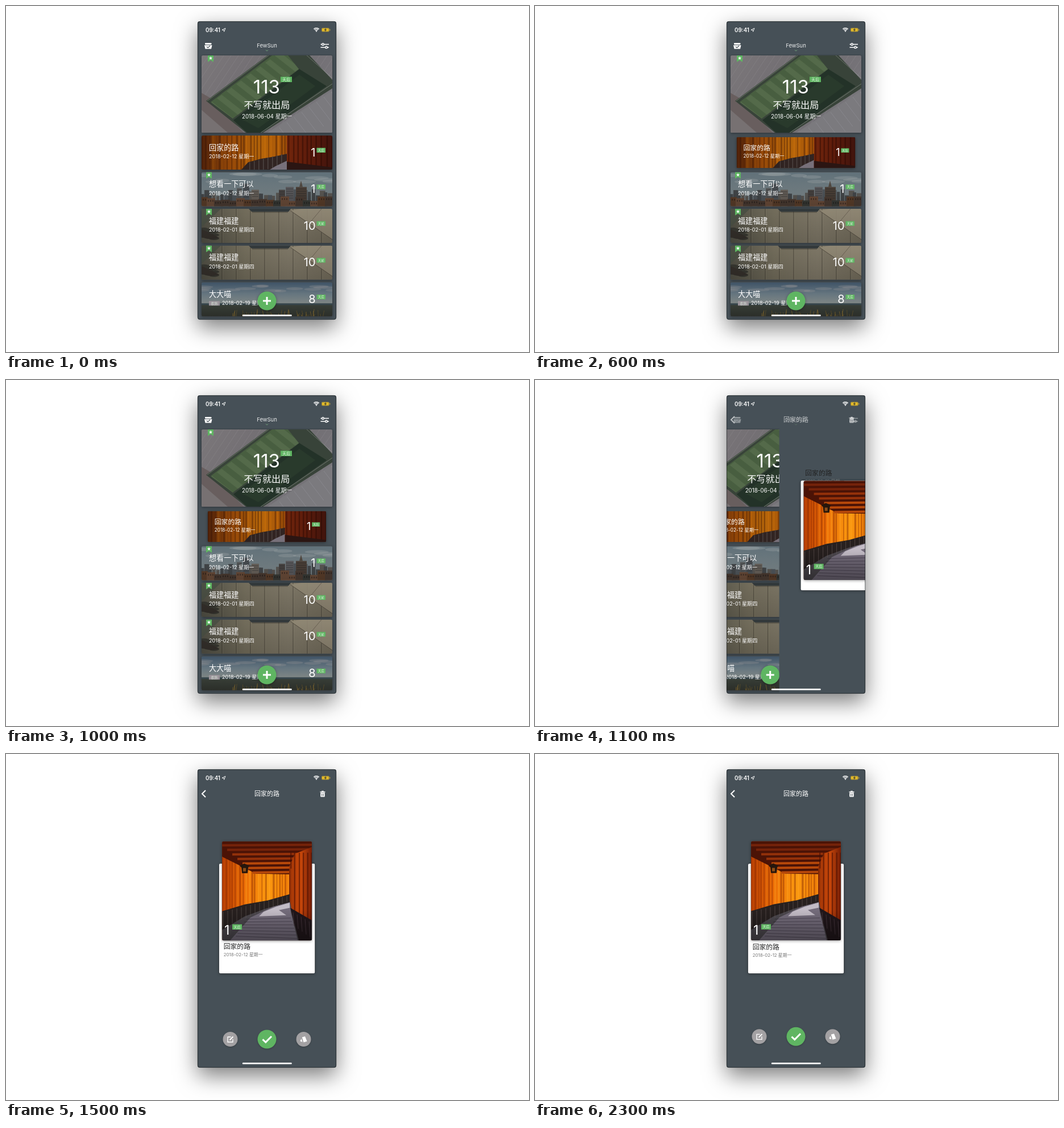
Animation, 920 px wide and 609 px high, one loop 2400 ms. Source, as an HTML page with a canvas:

```html
<!DOCTYPE html>
<html lang="zh">
<head>
<meta charset="utf-8">
<style>
html, body { margin: 0; width: 100%; height: 100%; overflow: hidden; background: #fff; }
canvas { display: block; width: 920px; height: 609px; }
</style>
</head>
<body>
<canvas id="stage"></canvas>
<script>
const canvas = document.getElementById('stage');
const dpr = window.devicePixelRatio || 1;
canvas.width = 920 * dpr;
canvas.height = 609 * dpr;
const c = canvas.getContext('2d');
const FONT = 'Inter, "Noto Sans CJK SC", "Noto Sans CJK", sans-serif';
const SLATE = '#465057', GREEN = '#5fb562';
const LOOP = 2400, STEP = 100;

function seeded(s) {
  return () => (s = (s * 16807) % 2147483647) / 2147483647;
}

function rect(color, x, y, w, h) {
  c.fillStyle = color;
  c.fillRect(x, y, w, h);
}

function round(color, x, y, w, h, r) {
  c.fillStyle = color;
  c.beginPath();
  c.roundRect(x, y, w, h, r);
  c.fill();
}

function disc(color, x, y, r) {
  c.fillStyle = color;
  c.beginPath();
  c.arc(x, y, r, 0, 7);
  c.fill();
}

function blob(color, x, y, rx, ry) {
  c.fillStyle = color;
  c.beginPath();
  c.ellipse(x, y, rx, ry, 0, 0, 7);
  c.fill();
}

function trace(p) {
  c.beginPath();
  for (let i = 0; i < p.length; i += 2) c.lineTo(p[i], p[i + 1]);
}

function poly(color, ...p) {
  trace(p);
  c.fillStyle = color;
  c.fill();
}

function line(color, width, ...p) {
  trace(p);
  c.strokeStyle = color;
  c.lineWidth = width;
  c.stroke();
}

function fade(x0, y0, x1, y1, ...colors) {
  const g = c.createLinearGradient(x0, y0, x1, y1);
  colors.forEach((k, i) => g.addColorStop(i / (colors.length - 1), k));
  return g;
}

function text(s, x, y, size, color = '#fff', align = 'left', weight = 400) {
  c.font = `${weight} ${size}px ${FONT}`;
  c.textAlign = align;
  c.fillStyle = color;
  c.fillText(s, x, y);
}

function group(draw) {
  c.save();
  draw();
  c.restore();
}

function shadow(color, blur, dy) {
  c.shadowColor = color;
  c.shadowBlur = blur * dpr;
  c.shadowOffsetY = dy * dpr;
}

// Rounded, shadowed panel; draw() works in its local coordinates.
function panel(x, y, w, h, r, draw) {
  group(() => {
    c.translate(x, y);
    group(() => {
      shadow('rgba(0,0,0,.4)', 5, 1);
      round('#555', 0, 0, w, h, r);
    });
    c.beginPath();
    c.roundRect(0, 0, w, h, r);
    c.clip();
    draw(w, h);
  });
}

function badge(s, x, y, w, h, size, color = GREEN) {
  rect(color, x, y, w, h);
  text(s, x + w / 2, y + h / 2 + size * 0.37, size, '#e4f5e4', 'center');
}

function flag(x, y) {
  poly(GREEN, x, y, x + 10, y, x + 10, y + 11.5, x + 5, y + 8.5, x, y + 11.5);
  const star = [];
  for (let i = 0; i < 10; i++) {
    const r = i % 2 ? 1.4 : 3.2, a = i * Math.PI / 5 - Math.PI / 2;
    star.push(x + 5 + r * Math.cos(a), y + 4.8 + r * Math.sin(a));
  }
  poly('#fff', ...star);
}

// ---- scenery ----

function stadium(w, h) {
  rect(fade(0, 0, w, h, '#858184', '#79757a', '#858489'), 0, 0, w, h);
  for (let i = -10; i < 26; i++) line('rgba(205,200,205,.13)', 1, i * 13, 0, i * 13 - 90, h);
  poly('#716666', 0, 66, 14, 74, 74, h, 0, h);
  poly('#817b7c', 0, 96, 46, h, 0, h);
  poly('#3d493e', 8, 80, 116, 0, 190, 0, 230, 43, 230, 58, 108, h, 78, h);
  poly('#26362b', 56, 114, 172, 24, 220, 54, 104, h, 80, h);
  poly('#2d3f30', 70, 112, 172, 34, 200, 54, 100, 128);
  group(() => {
    trace([16, 82, 124, 0, 152, 0, 171, 24, 55, 111]);
    c.clip();
    rect('#4e6645', 0, 0, w, h);
    for (let i = 0; i < 10; i++) {
      const x = 10 + i * 17, y = 88 - i * 12.5;
      poly('#5b7350', x, y, x + 8.5, y - 6.3, x + 60, y + 34, x + 51, y + 40);
    }
  });
  line('rgba(190,200,180,.5)', 0.8, 10, 80, 118, 0);
  line('rgba(190,195,190,.45)', 1, 104, h, 230, 50);
  line('rgba(190,195,190,.4)', 1, 185, 0, 230, 40);
  poly('#858489', 230, 62, 230, h, 116, h);
  for (let i = 0; i < 9; i++) line('rgba(205,205,212,.2)', 1, 124 + i * 13, h - i * 9, 150 + i * 13, h + 34 - i * 9);
  rect('rgba(0,0,0,.08)', 0, 0, w, h);
}

function gateStrip(w, h) {
  const rnd = seeded(31);
  rect(fade(0, 0, 150, 0, '#642a0b', '#a65009', '#b9680a', '#a35208'), 0, 0, 151, h);
  for (let x = 0; x < 150; x += 4 + rnd() * 5) {
    rect(rnd() < 0.5 ? 'rgba(60,20,5,.4)' : 'rgba(225,125,15,.32)', x, 0, 1 + rnd() * 3, h);
  }
  poly('#312422', 70, h, 82, 47, 104, 41, 128, 37, 151, 32, 151, h);
  for (let i = 0; i < 8; i++) rect('#4d4442', 84 + i * 8, 47 - i * 2, 1.5, 20);
  poly('#77707a', 120, h, 130, 54, 151, 44, 151, h);
  rect(fade(150, 0, w, 0, '#73260c', '#5c1b0b', '#40140d'), 150, 0, w - 150, h);
  for (let x = 152; x < w; x += 6 + rnd() * 5) rect('rgba(30,5,2,.4)', x, 0, 2.5, h);
  poly('#2b1512', 150, 46, w, 56, w, h, 150, h);
  rect(fade(0, 0, 110, 0, 'rgba(0,0,0,.2)', 'rgba(0,0,0,0)'), 0, 0, 110, h);
}

function city(w, h) {
  const rnd = seeded(77);
  rect(fade(0, 0, 0, 40, '#667780', '#87959a'), 0, 0, w, h);
  for (let i = 0; i < 12; i++) blob('rgba(190,196,196,.25)', rnd() * w, 3 + rnd() * 20, 12 + rnd() * 14, 3);
  for (let x = -2; x < w; x += 7) {
    const top = 30 + rnd() * 12;
    rect(['#4c5053', '#65625e', '#596066'][rnd() * 3 | 0], x, top, 5 + rnd() * 5, h);
  }
  for (const [x, y, bw, k] of [[62, 28, 9, '#636667'], [73, 20, 11, '#555b60'], [88, 31, 13, '#746d65'],
    [136, 31, 11, '#524d4b'], [148, 26, 14, '#666568'], [166, 26, 19, '#55483f']]) {
    rect(k, x, y, bw, h);
    for (let j = y + 3; j < 46; j += 4) rect('rgba(25,28,32,.35)', x + 1, j, bw - 2, 1.2);
  }
  poly('#595047', 172, 26, 175, 15, 178, 26);
  for (let x = -4; x < w; x += 13) {
    const y = 42 + rnd() * 9;
    rect(['#65452f', '#534238', '#775540', '#3f413c'][rnd() * 4 | 0], x, y, 15, h);
    for (let j = 2; j < 13; j += 4) rect('rgba(25,22,20,.45)', x + j, y + 3, 2, 3);
  }
  rect(fade(0, 0, 0, h, 'rgba(0,0,0,.05)', 'rgba(0,0,0,.25)'), 0, 0, w, h);
}

function wood(w, h) {
  rect(fade(0, 0, w, 0, '#535247', '#77715f', '#837c6b', '#77705f'), 0, 0, w, h);
  for (let x = 36; x < w; x += 25) {
    line('rgba(45,40,34,.55)', 1, x, 0, x, h);
    line('rgba(165,155,132,.22)', 1, x + 1.5, 0, x + 1.5, h);
  }
  poly('#4e5347', 0, 0, 34, 0, 0, 32);
  poly('rgba(151,142,123,.9)', 156, 3, 176, 0, w, 0, w, 54);
  line('#575044', 1, 156, 3, w, 54);
  line('rgba(70,62,52,.6)', 0.8, 190, 25, 211, 0);
  poly('#343b3d', 83, 0, 157, 0, 153, 5, 88, 5);
  rect('rgba(35,35,30,.3)', 89, 5, 63, 2);
  for (let i = 0; i < 9; i++) blob('#3b3b34', 4 + i % 3 * 9, 36 + i * 2, 9, 3);
  poly('#37322d', 0, 36, 18, 44, 31, 51, 17, 54, 0, 50);
  rect(fade(0, 0, 0, h, 'rgba(0,0,0,.04)', 'rgba(0,0,0,.18)'), 0, 0, w, h);
}

function meadow(w, h) {
  const rnd = seeded(52);
  rect(fade(0, 0, 0, 40, '#3f5366', '#65757f', '#828885'), 0, 0, w, 40);
  for (let i = 0; i < 14; i++) blob('rgba(155,152,152,.28)', rnd() * w, 3 + rnd() * 13, 10 + rnd() * 13, 2.5);
  rect('#36454b', 0, 37, w, 5);
  rect(fade(0, 40, 0, h, '#373d36', '#2b2e29'), 0, 40, w, 20);
  for (let i = 0; i < 55; i++) {
    const x = 50 + rnd() * 175, y = 47 + rnd() * 10;
    line(i % 3 ? '#5a4d2a' : '#76602e', 0.8, x, 60, x + rnd() * 4 - 2, y);
  }
}

function gatePhoto(w, h) {
  const rnd = seeded(9);
  rect('#8d2f06', 0, 0, w, h);
  rect(fade(0, 0, 119, 0, '#b83f04', '#eb6c06', '#fb990f', '#f07c08'), 0, 26, 120, 105);
  for (let x = 0; x < 119; x += 3 + rnd() * 4) {
    rect(rnd() < 0.55 ? 'rgba(125,35,0,.42)' : 'rgba(255,165,35,.35)', x, 28, 1 + rnd() * 2.5, 105);
  }
  // receding ceiling beams
  poly('#4b1306', 0, 0, w, 0, w, 24, 119, 58, 60, 57, 0, 27);
  for (let i = 0; i < 7; i++) {
    const y = 5 + i * 8, x = i * 9;
    poly(['#75230a', '#94310a', '#b7480a'][Math.min(2, i >> 1)], x, y, w - i * 6, y - 1, w - i * 6, y + 3, x, y + 4);
  }
  // right wall
  poly(fade(118, 0, w, 0, '#9f3406', '#c9480a', '#761e06'), 118, 45, 128, 22, w, 10, w, h, 118, 122);
  for (let x = 120; x < w; x += 5 + rnd() * 4) rect('rgba(65,12,2,.55)', x, 20, 2.3, 130);
  rect(fade(118, 0, 124, 0, '#7a2505', '#b94108'), 118, 48, 5, 70);
  // path, posts and dark edge
  poly('#4b474d', 0, 148, 40, 125, 119, 104, 122, 118, w, 151, w, h, 0, h);
  poly('#746c7b', 14, h, 50, 134, 92, 114, 119, 107, 121, 125, 133, h);
  poly('#c3bcc6', 73, 124, 95, 115, 119, 108, 119, 117, 100, 121, 113, 130, 65, 132);
  for (let i = 0; i < 7; i++) line('rgba(38,33,45,.45)', 1, 42 - i * 3, 137 + i * 5, 121 + i * 2, 135 + i * 6);
  poly('#27201f', 0, 123, 40, 111, 80, 104, 119, 93, 119, 107, 78, 118, 40, 132, 0, 156);
  for (let i = 0; i < 15; i++) {
    const x = 2 + i * 8;
    line('rgba(110,98,96,.55)', 1, x, 124 - i * 2, x, 151 - i * 3.2);
  }
  poly('#20161a', 120, 117, w, 139, w, h, 135, h);
  for (let i = 0; i < 5; i++) line('#42333a', 1, 125 + i * 7, 125 + i * 4, 127 + i * 7, 149 + i * 5);
  poly('#26160c', 31, 43, 39, 39, 48, 43, 46, 46, 45, 56, 35, 56, 34, 46);
  rect('#8e4e18', 37, 47, 5, 6);
  rect(fade(0, 120, 0, h, 'rgba(0,0,0,0)', 'rgba(0,0,0,.35)'), 0, 120, w, 55);
}

// ---- screens ----

const rows = [
  { y: 228, title: '回家的路', date: '2018-02-12 星期一', n: '1', unit: '天后', art: gateStrip },
  { y: 292.5, title: '想看一下可以', date: '2018-02-12 星期一', n: '1', unit: '天后', art: city, flag: true },
  { y: 357, title: '福建福建', date: '2018-02-01 星期四', n: '10', unit: '天前', art: wood, flag: true },
  { y: 421.7, title: '福建福建', date: '2018-02-01 星期四', n: '10', unit: '天前', art: wood, flag: true },
  { y: 486.3, title: '大大喵', date: '2018-02-19 星期一', n: '8', unit: '天后', art: meadow, tag: '农历' }
];

function drawRow(r) {
  panel(344, r.y, 230, 60, 2.5, (w, h) => {
    r.art(w, h);
    text(r.title, 13, 25.7, 13.1);
    if (r.tag) badge(r.tag, 13, 33, 19, 8, 6, '#9a939a');
    text(r.date, r.tag ? 36 : 13, 40, 9.1);
    text(r.n, 200.5, 36.5, 20, '#fff', 'right');
    badge(r.unit, 202.5, 21.7, 15.5, 8.3, 5.6);
  });
  if (r.flag) flag(352, r.y);
}

function drawList(press) {
  panel(344, 87, 230, 136, 2.5, (w, h) => {
    stadium(w, h);
    text('113', 138, 67, 33, '#fff', 'right');
    badge('天后', 139, 37.5, 20, 9.5, 7);
    text('不写就出局', 115, 93.3, 16.2, '#fff', 'center');
    text('2018-06-04 星期一', 115, 110.5, 9.8, '#fff', 'center');
  });
  flag(355, 87);
  rows.forEach((r, i) => group(() => {
    if (i === 0) {
      const s = 1 - 0.095 * press;
      c.translate(459, 257.8);
      c.scale(s, s);
      c.translate(-459, -257.8);
    }
    drawRow(r);
  }));
  group(() => {
    shadow('rgba(0,0,0,.35)', 5, 1);
    disc(GREEN, 459, 519, 16.5);
  });
  rect('#fff', 452, 517.5, 14, 3);
  rect('#fff', 457.5, 512, 3, 14);
}

function drawListBar() {
  round('#fff', 350, 65, 11.5, 3, 1.2);
  poly('#fff', 349, 69, 362.5, 69, 361, 75.5, 350.5, 75.5);
  line(SLATE, 1.2, 353, 71.5, 355.2, 73.5, 359, 70);
  text('FewSun', 459, 73.2, 9.5, '#e8eaeb', 'center');
  line('#6f9f78', 1, 456.8, 77.3, 459, 79.2, 461.2, 77.3);
  line('#fff', 1.5, 553.5, 67.5, 568, 67.5);
  line('#fff', 1.5, 553.5, 72.8, 568, 72.8);
  for (const [x, y] of [[557.5, 67.5], [563.5, 72.8]]) {
    disc('#fff', x, y, 2.5);
    disc(SLATE, x, y, 1.1);
  }
}

function drawDetailBar() {
  line('#fff', 2, 351, 64, 345, 70, 351, 76);
  text('回家的路', 459, 74, 11, '#fff', 'center', 500);
  rect('#fff', 552.5, 66, 9, 1.5);
  rect('#fff', 555.2, 64.8, 3.6, 1.5);
  round('#fff', 553.2, 68, 7.6, 7.5, 1);
  rect(SLATE, 555.3, 69.5, 0.9, 4.5);
  rect(SLATE, 557.8, 69.5, 0.9, 4.5);
}

function drawDetail(t) {
  const e = Math.min(8, Math.exp((1300 - t) / 75));
  const up = 3 * e, down = -2 * e, slide = -22 * e;
  rect(SLATE, 337, 27, 244, 525);
  panel(374.8, 193 + down, 168.5, 193.3, 3, (w, h) => rect('#fff', 0, 0, w, h));
  text('回家的路', 382.7, 344.2 + slide, 11.8, '#222');
  text('2018-02-12 星期一', 382.7, 357.4 + slide, 7.9, '#777');
  panel(380, 153.5 + up, 158, 174.5, 3, (w, h) => {
    gatePhoto(w, h);
    text('1', 4, 164.5, 23);
    badge('天后', 18, 146, 17, 9.3, 6);
  });
}

function drawButtons(t) {
  const y = 497.3 + 4.7 * Math.pow(5, (1500 - t) / 100);
  if (y > 575) return;
  group(() => {
    c.translate(0, y);
    group(() => {
      shadow('rgba(0,0,0,.25)', 3, 1);
      disc('#a3a1a3', 394.5, 0, 13);
      disc(GREEN, 459, 0, 16.5);
      disc('#a3a1a3', 523.5, 0, 13);
    });
    line('#fff', 1.3, 395.5, -4, 390, -4, 390, 5, 399, 5, 399, 0);
    line('#fff', 1.8, 393.5, 1.5, 399.5, -4.5);
    line('#fff', 3, 451.5, 0.3, 456.8, 5.3, 467, -5);
    poly('#fff', 520.8, -3.6, 526, -5, 529.5, 3.7, 523.5, 5.5);
    poly('#fff', 519.5, -1, 521.5, 5, 517.5, 3.6);
  });
}

function drawStatus() {
  text('09:41', 351, 45.5, 9.7, '#fff', 'left', 600);
  line('#fff', 0.9, 380, 42.2, 386, 39, 383.6, 45.2, 383, 42.4, 380, 42.2);
  c.lineCap = 'butt';
  for (const r of [2.4, 4.4, 6.4]) {
    c.beginPath();
    c.arc(546, 45, r, -Math.PI * 0.76, -Math.PI * 0.24);
    c.strokeStyle = '#fff';
    c.lineWidth = 1.4;
    c.stroke();
  }
  disc('#fff', 546, 44.6, 1);
  round('#97853f', 555, 38.5, 13.7, 7, 1.8);
  round('#e4bb28', 556, 39.4, 11.7, 5.2, 1);
  rect('#c8a93c', 569.2, 40.6, 1.1, 2.8);
  poly('#3d3c32', 562.8, 38.8, 559.5, 42.6, 561.6, 42.6, 560.8, 45.2, 564.4, 41.4, 562.2, 41.4);
}

function spring(t, start, rate) {
  const x = Math.max(0, t - start) / 1000 * rate;
  return 1 - (1 + x) * Math.exp(-x);
}

function render(t) {
  c.setTransform(dpr, 0, 0, dpr, 0, 0);
  rect('#fff', 0, 0, 920, 609);
  group(() => {
    shadow('rgba(0,0,0,.52)', 38, 14);
    round(SLATE, 337, 27, 244, 525, 4);
  });
  const press = spring(t, 200, 14), push = spring(t, 1000, 21);
  group(() => {
    c.beginPath();
    c.roundRect(337, 27, 244, 525, 4);
    c.clip();
    group(() => {
      c.translate(-73 * push, 0);
      drawList(press);
    });
    if (push > 0) group(() => {
      c.translate(244 * (1 - push), 0);
      drawDetail(t);
    });
    if (push > 0) drawButtons(t);
    rect(SLATE, 337, 27, 244, 58);
    c.globalAlpha = 1 - push;
    drawListBar();
    c.globalAlpha = push;
    drawDetailBar();
    c.globalAlpha = 1;
    drawStatus();
    round('#fff', 415.8, 543.3, 87, 2.7, 1.35);
  });
  c.beginPath();
  c.roundRect(337.3, 27.3, 243.4, 524.4, 4);
  c.strokeStyle = 'rgba(20,24,27,.7)';
  c.lineWidth = 0.9;
  c.stroke();
}

let shown = -1;
const begin = performance.now();
function tick() {
  const t = Math.floor((performance.now() - begin) % LOOP / STEP) * STEP;
  if (t !== shown) render(shown = t);
  requestAnimationFrame(tick);
}
tick();
</script>
</body>
</html>
```
